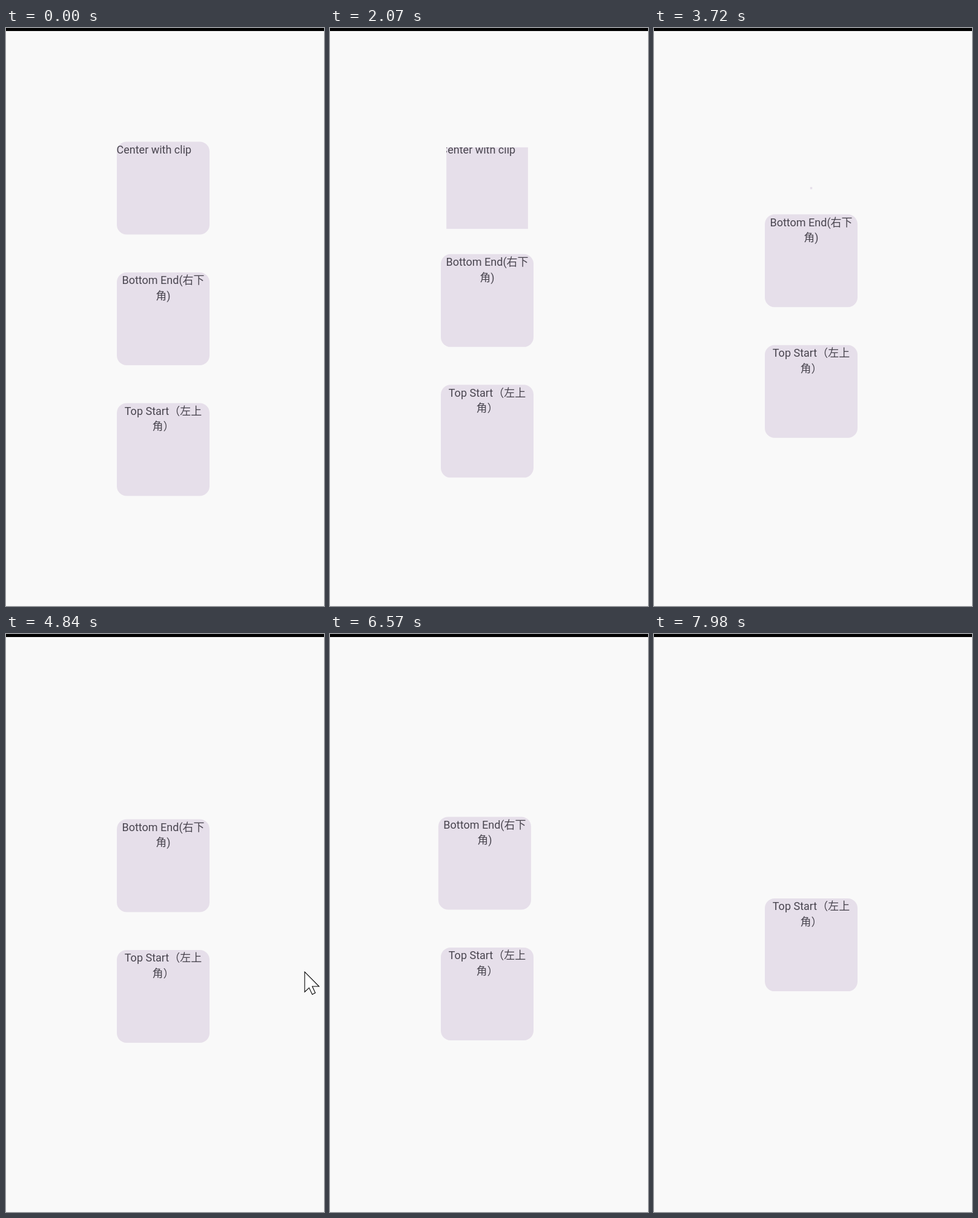
An HTML page with a canvas that plays this animation: 525x953 px, repeating every 8000 ms.

```html
<!DOCTYPE html>
<html lang="zh">
<head>
<meta charset="utf-8">
<title>Shrink out</title>
<style>
  html, body { margin: 0; width: 100%; height: 100%; overflow: hidden; background: #f9f9f9; }
  canvas { display: block; width: 525px; height: 953px; }
</style>
</head>
<body>
<canvas></canvas>
<script>
const LOOP = 8000, SHRINK = 3000, LEAVE = 280;
const BOX = 153, FULL = 195;            // card size, and card with its padding
const CX = 259.5, TOP_CY = 264, PITCH = 215.5;

const canvas = document.querySelector('canvas');
const ctx = canvas.getContext('2d');
const dpr = window.devicePixelRatio || 1;
canvas.width = 525 * dpr;
canvas.height = 953 * dpr;

const cubic = (u, a, b, c, d) => {
  const v = 1 - u;
  return v * v * v * a + 3 * v * v * u * b + 3 * v * u * u * c + u * u * u * d;
};

// cubic-bezier(0.4, 0, 0.2, 1)
function ease(x) {
  if (x <= 0) return 0;
  if (x >= 1) return 1;
  let lo = 0, hi = 1, u;
  for (let i = 0; i < 30; i++) {
    u = (lo + hi) / 2;
    if (cubic(u, 0, 0.4, 0.2, 1) < x) lo = u; else hi = u;
  }
  return cubic(u, 0, 0, 1, 1);
}

const sizeAt = (t, start) => FULL * (1 - ease((t - start) / SHRINK));

// A card clipped by its shrinking container; pull = 1 keeps the bottom end in view
function card(cy, size, pull, align, lines) {
  if (size < 0.1) return;
  const shift = pull * (FULL - size) / 2;
  const x = CX - BOX / 2 - shift, y = cy - BOX / 2 - shift;
  ctx.save();
  ctx.beginPath();
  ctx.rect(CX - size / 2, cy - size / 2, size, size);
  ctx.clip();
  ctx.fillStyle = '#e6dfea';
  ctx.beginPath();
  ctx.roundRect(x, y, BOX, BOX, 16);
  ctx.fill();
  ctx.fillStyle = '#49454f';
  ctx.textAlign = align;
  const textX = align === 'left' ? x - 0.5 : x + BOX / 2;
  lines.forEach((line, i) => ctx.fillText(line, textX, y + 19.4 + i * 25.5));
  ctx.restore();
}

// The pointer curves in, rests, then slides out to the right
const visits = [
  { enter: 300, rest: 770, leave: 1260, curve: [[390, 749], [560, 480], [400, 65], [302, 280]], exit: [525, 400] },
  { enter: 4840, rest: 5640, leave: 6220, curve: [[493, 557], [420, 490], [300, 450], [269, 418]], exit: [483, 560] }
];

function pointerAt(t) {
  const visit = visits.find(v => t >= v.enter && t < v.leave + LEAVE);
  if (!visit) return null;
  const k = Math.min(1, (t - visit.enter) / (visit.rest - visit.enter));
  const out = Math.max(0, (t - visit.leave) / LEAVE);
  return [0, 1].map(axis => {
    const p = cubic(k * (1.4 - 0.4 * k), ...visit.curve.map(point => point[axis]));
    return p + (visit.exit[axis] - p) * out;
  });
}

const arrow = new Path2D('M.5 .5V33.5L7.8 26.7 13 37.6 18 35.2 13 24.4H24.2Z');

function draw(t) {
  ctx.setTransform(dpr, 0, 0, dpr, 0, 0);
  ctx.fillStyle = '#f9f9f9';
  ctx.fillRect(0, 0, 525, 953);
  ctx.fillStyle = '#000';
  ctx.fillRect(0, 0, 525, 5);
  ctx.font = '18px Roboto, "Noto Sans CJK SC", "Noto Sans CJK", sans-serif';

  const first = sizeAt(t, 1235), second = sizeAt(t, 6200);
  const lift = (FULL - first) / 2;
  card(TOP_CY, first, 0, 'left', ['Center with clip']);
  card(TOP_CY + PITCH - lift, second, 1, 'center', ['Bottom End(右下', '角)']);
  card(TOP_CY + 2 * PITCH - lift - (FULL - second) / 2, FULL, 0, 'center', ['Top Start（左上', '角）']);

  const pointer = pointerAt(t);
  if (pointer) {
    ctx.translate(...pointer);
    ctx.fillStyle = '#fff';
    ctx.fill(arrow);
    ctx.strokeStyle = '#000';
    ctx.lineWidth = 1.1;
    ctx.stroke(arrow);
  }
}

const begin = performance.now();
function frame() {
  draw((performance.now() - begin) % LOOP);
  requestAnimationFrame(frame);
}
frame();
</script>
</body>
</html>
```
